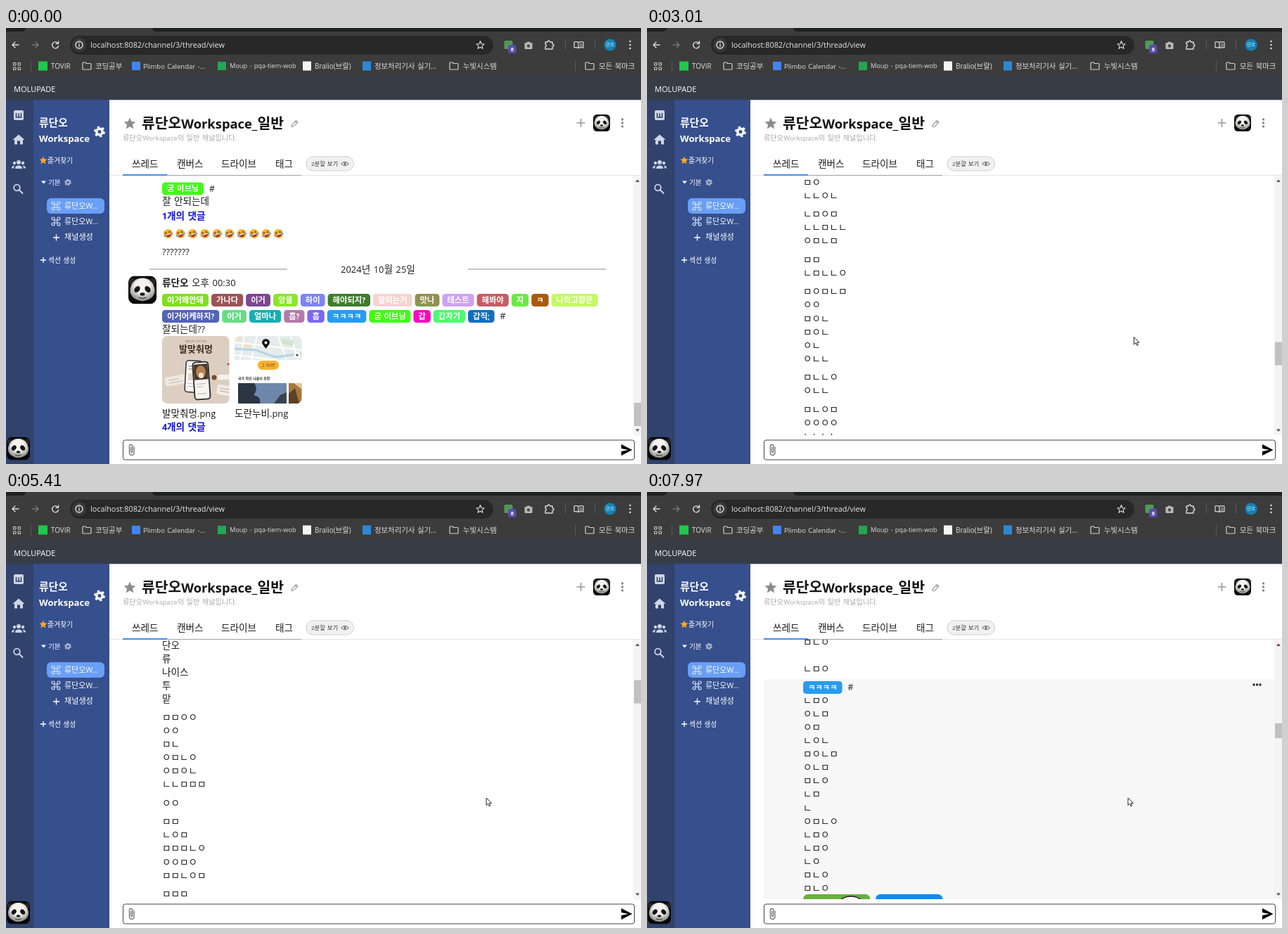
Recreate the animation shown at these times as an HTML page. Size 903 by 620 pixels, loop 8 s.

```html
<!DOCTYPE html>
<html lang="ko">
<head>
<meta charset="utf-8">
<title>Channel thread</title>
<style>
html,body{margin:0;width:100%;height:100%;overflow:hidden;background:#fff}
svg{display:block}
text{white-space:pre;word-spacing:.09em}
text,.ko{font-family:"Noto Sans CJK KR","Noto Sans CJK",sans-serif}
.en{font-family:"Open Sans","Noto Sans",sans-serif}
.ln{fill:none;stroke-linecap:round;stroke-linejoin:round}
</style>
</head>
<body>
<svg id="stage" width="903" height="620" viewBox="0 0 903 620">
<defs>
  <clipPath id="view"><rect x="147" y="210" width="756" height="369"/></clipPath>
  <clipPath id="round"><rect width="40" height="40" rx="9"/></clipPath>
  <clipPath id="card"><rect width="95.5" height="96" rx="7"/></clipPath>
  <radialGradient id="fur" cx=".5" cy=".35" r=".62"><stop offset=".45" stop-color="#f4f3f0"/><stop offset="1" stop-color="#8f8f8d"/></radialGradient>
  <symbol id="panda" viewBox="0 0 40 40">
    <g clip-path="url(#round)">
      <rect width="40" height="40" fill="#080808"/>
      <circle cx="5.500" cy="8.500" r="5" fill="#262626"/><circle cx="34.500" cy="8.500" r="5" fill="#262626"/>
      <path d="M20 3Q29 3 34 10Q39 18 37 25Q34 34 20 36Q6 34 3 25Q1 18 6 10Q11 3 20 3Z" fill="url(#fur)"/>
      <ellipse cx="12.500" cy="19" rx="3.600" ry="5" fill="#141414" transform="rotate(38 12.5 19)"/>
      <ellipse cx="27.500" cy="19" rx="3.600" ry="5" fill="#141414" transform="rotate(-38 27.5 19)"/>
      <ellipse cx="20" cy="26" rx="3.400" ry="2.200" fill="#1a1a1a"/>
      <path d="M15 30.500Q20 33.500 25 30.500" class="ln" stroke="#4a4a4a" stroke-width="1.400"/>
    </g>
  </symbol>
  <symbol id="laugh" viewBox="0 0 16 16">
    <g transform="rotate(-18 8 8)">
      <circle cx="8" cy="8" r="7" fill="#fbb32f"/>
      <path d="M3.800 8.500H12.200Q12 13 8 13T3.800 8.500Z" fill="#a03428"/>
      <path d="M4.500 8.600H11.500V9.800H4.500Z" fill="#fff"/>
      <path d="M4 4.800L6.500 6L4 7M12 4.800L9.500 6L12 7" class="ln" stroke="#6b3a12"/>
      <circle cx="2.300" cy="9.500" r="1.500" fill="#5aa9ee"/><circle cx="13.700" cy="9.500" r="1.500" fill="#5aa9ee"/>
    </g>
  </symbol>
  <symbol id="folder" viewBox="0 0 14 12"><path d="M1 2Q1 1 2 1H5L6.500 2.500H12Q13 2.500 13 3.500V10Q13 11 12 11H2Q1 11 1 10Z" class="ln" stroke="#cfcfcf" stroke-width="1.200"/></symbol>
  <symbol id="cmd" viewBox="0 0 14 14"><path d="M5 5H9V9H5ZM5 5H3A2 2 0 1 1 5 3ZM9 5V3A2 2 0 1 1 11 5ZM9 9H11A2 2 0 1 1 9 11ZM5 9V11A2 2 0 1 1 3 9Z" class="ln" stroke="#d5e2fb" stroke-width="1.200"/></symbol>
  <symbol id="gear" viewBox="0 0 16 16"><circle cx="8" cy="8" r="4.200" fill="none" stroke="currentColor" stroke-width="3.400"/><circle cx="8" cy="8" r="6.800" fill="none" stroke="currentColor" stroke-width="2.200" stroke-dasharray="3.560"/></symbol>
  <symbol id="star" viewBox="0 0 20 20"><path d="M10 1L12.700 7.200L19.400 7.800L14.300 12.200L15.900 18.800L10 15.300L4.100 18.800L5.700 12.200L.6 7.800L7.300 7.200Z"/></symbol>
</defs>

<!-- browser -->
<rect width="903" height="70" fill="#3c3c3c"/>
<rect width="903" height="5" fill="#1f2020"/>
<path d="M22 5Q28 5 28 0H208Q208 5 214 5Z" fill="#3c3c3c"/>
<rect x="91" y="11" width="602" height="27" rx="13.500" fill="#282828"/>
<circle cx="104" cy="24" r="10" fill="#3a3a3a"/>
<g class="ln" stroke="#dcdcdc" stroke-width="1.400">
  <path d="M18 24H9M13 20L9 24L13 28"/>
  <path d="M37 24H46M42 20L46 24L42 28" stroke="#777"/>
  <path d="M74 22A4.500 4.500 0 1 0 74.500 25.500M74.500 19V22.300H71.200"/>
  <circle cx="104" cy="24" r="5"/><path d="M104 23.500V26.500M104 21.300V21.500"/>
  <path d="M674.500 18.500L676 22.500L680 22.800L677 25.400L678 29.300L674.500 27.200L671 29.300L672 25.400L669 22.800L673 22.500Z" stroke-width="1.100"/>
  <path d="M767 20H770A1.800 1.800 0 0 1 773.600 20H777V23A1.800 1.800 0 0 1 777 26.600V30H767V26.500A1.800 1.800 0 0 0 767 23Z"/>
  <path d="M808 20Q811 19 814 20.500Q817 19 821 20V28Q817 27 814 28.500Q811 27 808 28ZM814 20.500V28.500M816.500 23H819M816.500 25.500H819" stroke-width="1.200"/>
</g>
<path d="M795.500 17V31M837.500 17V31M35.500 47V61M809.500 47V61" stroke="#5a5a5a"/>
<rect x="708.500" y="18" width="12" height="12" rx="2" fill="#4e9a57"/>
<rect x="714" y="24" width="11.500" height="12" rx="3" fill="#5b4bb0"/>
<path d="M738 21.500H740.500L741.300 20H744.700L745.500 21.500H748V29.500H738Z" fill="#b9b9b9" stroke="#b9b9b9" stroke-linejoin="round"/><circle cx="743" cy="25.500" r="2.200" fill="#4a4a4a"/>
<circle cx="859" cy="24" r="8.500" fill="#1283b8"/>
<g fill="#dcdcdc"><circle cx="887.500" cy="19" r="1.300"/><circle cx="887.500" cy="24" r="1.300"/><circle cx="887.500" cy="29" r="1.300"/></g>
<path d="M10.500 49.500H14V53H10.500ZM17 49.500H20.500V53H17ZM10.500 56H14V59.500H10.500ZM17 56H20.500V59.500H17Z" fill="none" stroke="#cfcfcf"/>
<rect x="46" y="47.500" width="13" height="13" fill="#1ec94c"/>
<rect x="179" y="48" width="12" height="12" fill="#4285f4"/>
<rect x="301" y="48" width="12" height="12" fill="#22a652"/>
<rect x="422" y="47.500" width="12" height="13" fill="#f4f4f4"/>
<rect x="507" y="47.500" width="12" height="13" fill="#2b88d8"/>
<use href="#folder" x="108" y="48" width="14" height="12"/><use href="#folder" x="630" y="48" width="14" height="12"/><use href="#folder" x="823" y="48" width="14" height="12"/>

<!-- app frame -->
<rect y="69" width="903" height="33" fill="#373d47"/>
<rect y="102" width="39" height="518" fill="#31426c"/>
<rect x="39" y="102" width="108" height="518" fill="#364f8d"/>
<path d="M147 102.500H903" stroke="#c9cbd0"/>
<rect x="11" y="117" width="14" height="14" rx="2" fill="#cdd5e6"/>
<path d="M14.500 121V127H21.500V121M18 121.500V127" fill="none" stroke="#31426c" stroke-width="1.500"/>
<g fill="#cdd5e6">
  <path d="M18 151.500L26.500 159H24V165.500H20V160.500H16V165.500H12V159H9.500Z"/>
  <circle cx="18" cy="191" r="3"/><circle cx="12" cy="192" r="2.200"/><circle cx="24" cy="192" r="2.200"/>
  <path d="M13 200Q13 195.500 18 195.500T23 200ZM8 199.500Q8 195.500 12.300 195.700Q11 197 11.200 199.500ZM28 199.500Q28 195.500 23.700 195.700Q25 197 24.800 199.500Z"/>
</g>
<path d="M18.500 230L23.500 235" class="ln" stroke="#cdd5e6" stroke-width="2"/><circle cx="15.500" cy="227" r="4.300" fill="none" stroke="#cdd5e6" stroke-width="1.800"/>
<use href="#panda" x="1" y="581" width="33" height="34"/>
<use href="#gear" x="125" y="139.500" width="16" height="16" color="#fff"/>
<use href="#gear" x="83" y="214.500" width="10" height="10" color="#aeb5c4"/>
<use href="#star" x="47" y="182" width="12" height="12" fill="#ffa726"/>
<path d="M50 217.500H57L53.500 221.500Z" fill="#fff"/>
<rect x="58" y="242" width="82" height="22" rx="6" fill="#699ff5"/>
<use href="#cmd" x="64" y="246" width="14" height="14"/><use href="#cmd" x="64" y="268" width="14" height="14"/>
<path d="M67 298H76M71.500 293.500V302.500M49 330H57M53 326V334" stroke="#fff" stroke-width="1.300"/>

<!-- channel header -->
<use href="#star" x="167" y="126.500" width="18" height="18" fill="#8b8b8b"/>
<path d="M406 140.500L406.500 137.500L412.500 131.500L415 134L409 140ZM411 133L413.500 135.500" fill="none" stroke="#9a9a9a" stroke-width="1.200"/>
<path d="M811.500 135H823.500M817.500 129V141" stroke="#999" stroke-width="1.600"/>
<use href="#panda" x="835" y="123" width="24" height="24"/>
<g fill="#8a8a8a"><circle cx="876.500" cy="130" r="1.700"/><circle cx="876.500" cy="135" r="1.700"/><circle cx="876.500" cy="140" r="1.700"/></g>
<rect x="427" y="183" width="67.500" height="20" rx="10" fill="#f1f1f1" stroke="#cfcfcf"/>
<path d="M476.500 193Q482 187.500 487.500 193Q482 198.500 476.500 193Z" fill="none" stroke="#666"/><circle cx="482" cy="193" r="1.700" fill="#666"/>
<path d="M147 209.500H903" stroke="#e4e4e4"/><path d="M229 209.500H420" stroke="#a0a0a0"/>

<g clip-path="url(#view)"><g id="scroll">
  <rect id="hover" x="166" width="726" fill="#f7f7f7"/>
  <g id="posts"></g><g id="latest"></g><g id="older"></g>
  <g id="dots" fill="#222"><circle cx="863" r="1.700"/><circle cx="867.500" r="1.700"/><circle cx="872" r="1.700"/></g>
</g></g>
<path d="M166 209H229" stroke="#4a8ce8" stroke-width="2"/>

<rect x="892" y="210" width="11" height="369" fill="#f4f4f4"/>
<rect id="thumb" x="893" width="10" fill="#c1c1c1"/>
<path id="up" d="M895 219L898 215.500L901 219Z"/><path d="M895 570.500L898 574L901 570.500Z" fill="#555"/>

<rect x="166.500" y="586" width="727" height="28" rx="3" fill="#fff" stroke="#444"/>
<path d="M182 595.500V604A3.300 3.300 0 0 1 175.400 604V594.500A2.200 2.200 0 0 1 179.800 594.500V602.500A1 1 0 0 1 177.600 602.500V596" class="ln" stroke="#666" stroke-width="1.200"/>
<path d="M875 592L890.500 600L875 608V602L885 600L875 598Z" fill="#000"/>
<g id="labels"></g>
<path id="cursor" d="M.5 .5V11L3 8.700L4.700 12.400L6.300 11.700L4.700 8.100H8Z" fill="#fff" stroke="#111" stroke-width=".9"/>
</svg>
<script>
const $ = id => document.getElementById(id);
const LOOP = 8000, LOAD = 6280, NAME = '류단오', GIVEN = '단오', FAMILY = '류';

function make(parent, tag, attrs, html = '') {
  const el = document.createElementNS('http://www.w3.org/2000/svg', tag);
  for (const k in attrs) el.setAttribute(k, attrs[k]);
  el.innerHTML = html;
  return parent.appendChild(el);
}

// y is the middle of the line; Latin runs are set a little smaller than Hangul
function label(parent, x, y, str, size = 13.6, fill = '#1c1c1c', bold = false, anchor = 'start') {
  const latin = size * (bold ? 0.9 : 0.95);
  const runs = str.match(/[ㄱ-힣]+|[^ㄱ-힣]+/g) || [];
  make(parent, 'text', { x, y: y + size * 0.36, fill, 'font-size': size, 'font-weight': bold ? 700 : 400, 'text-anchor': anchor },
    runs.map(r => /[ㄱ-힣]/.test(r) ? `<tspan class="ko">${r}</tspan>`
      : `<tspan class="en" font-size="${latin}">${r}</tspan>`).join(''));
}

const TAGS = {
  '이거왜안돼': '#80e01e', '가나다': '#9b5357', '이거': '#7f4592', '앙을': '#8be62b', '하이': '#7e84f7',
  '해야되지?': '#407c2c', '잘되는거': '#f5d3cf', '맛나': '#8f9150', '테스트': '#cda3f0', '해봐야': '#c75b66',
  '지': '#6ce943', 'ㅋ': '#a85a0e', '나의고향은': '#c3f965', '이거어케하지?': '#5363b5', '이거2': '#66dd82',
  '얼마나': '#18aeb1', '흠?': '#b57aa8', '흠': '#7d69f0', 'ㅋㅋㅋㅋ': '#279cf0', '굳 이브닝': '#43fb1b',
  '갑': '#f50cbc', '갑자기': '#4efa6f', '갑직;': '#1070be', '왜이러냐?': '#6060f2', '픽스': '#d9ba06', '굳굳': '#b480ec'
};
const GLYPH = { ' ': 3.4, '?': 4.8, ';': 2.8 };

function tags(g, x, y, list, hash = true) {
  for (const key of list ? list.split('|') : []) {
    const name = key.replace(/\d/, '');
    const width = [...name].reduce((w, c) => w + (GLYPH[c] || 10.4), 14);
    make(g, 'rect', { x, y: y - 9, width, height: 18, rx: 4.5, fill: TAGS[key] });
    label(g, x + 7, y - 0.3, name, 11.3, '#fff', true);
    x += width + 4;
  }
  if (hash) label(g, x + 4, y - 0.5, '#', 13);
}
const lines = (g, y, str) => str.split('|').forEach((s, i) => label(g, 222, y + i * 19.08, s));
const replies = (g, y, n) => label(g, 222, y, n + '개의 댓글', 13.6, '#1010dc', true);

function day(g, y, d) {
  make(g, 'path', { d: `M204 ${y}H400M657 ${y}H853`, stroke: '#8c8c8c' });
  label(g, 529, y, `2024년 10월 ${d}일`, 13.6, '#1c1c1c', false, 'middle');
}
function author(g, y, time) {
  make(g, 'use', { href: '#panda', x: 174, y: y - 10.5, width: 40, height: 40 });
  label(g, 222, y - 0.5, NAME, 13.6, '#1c1c1c', true);
  label(g, 264, y - 0.5, time);
}

let seed = 11;
const rnd = () => (seed = seed * 16807 % 2147483647) / 2147483647;
function chatter(g, from, to) {
  for (let y = from; y < to; y += rnd() < 0.2 ? 26.5 : 19.08) {
    let s = '';
    for (let n = 1 + rnd() * 4; n > 0; n--) s += 'ㅇㄴㅁ'[rnd() * 3 | 0];
    label(g, 222, y, s);
  }
}
const image = (g, x, y, html) => make(make(g, 'g', { transform: `translate(${x} ${y})` }), 'g', { 'clip-path': 'url(#card)' }, html);
const section = (parent, y) => make(parent, 'g', { transform: `translate(0 ${y})` });

function buildPosts() {
  const root = $('posts');

  let g = section(root, 3367);
  chatter(g, 149, 205);
  tags(g, 222, 228.5, '굳 이브닝');
  lines(g, 246, '잘 안되는데');
  replies(g, 267, 1);
  for (let i = 0; i < 10; i++) make(g, 'use', { href: '#laugh', x: 223 + i * 17.45, y: 285, width: 15, height: 15 });
  lines(g, 318, '???????');
  day(g, 343, 25);
  author(g, 363, '오후 00:30');
  tags(g, 222, 387, '이거왜안돼|가나다|이거|앙을|하이|해야되지?|잘되는거|맛나|테스트|해봐야|지|ㅋ|나의고향은', false);
  tags(g, 222, 410, '이거어케하지?|이거2|얼마나|흠?|흠|ㅋㅋㅋㅋ|굳 이브닝|갑|갑자기|갑직;');
  lines(g, 428, '잘되는데??');
  const poster = image(g, 222, 438, `<rect width="96" height="96" fill="#dccfc2"/>
    <g transform="rotate(-10 16 62)"><rect x="4" y="57" width="34" height="13" rx="3" fill="#efe8e0"/><path d="M9 62H24M9 66H30" stroke="#c4b9ae"/></g>
    <g transform="rotate(10 88 76)"><rect x="78" y="70" width="26" height="14" rx="3" fill="#f1ebe4"/><path d="M82 75H96M82 79H96" stroke="#b5aaa0"/></g>
    <g transform="rotate(3 44 60)"><rect x="33" y="35" width="23" height="45" rx="4" fill="#f8f8f8" stroke="#33302e" stroke-width="1.500"/><path d="M37 43H52M37 47H48" stroke="#c9b9a5" stroke-width="2"/><rect x="37" y="53" width="15" height="10" fill="#e3d6c6"/><path d="M37 68H52M37 72H48" stroke="#c2b6aa"/></g>
    <g transform="rotate(-4 56 64)"><rect x="45" y="37" width="22" height="53" rx="4" fill="#f7f5f2" stroke="#2a2725" stroke-width="1.800"/><path d="M46 40H66V62H46Z" fill="#463a31"/><ellipse cx="56" cy="51" rx="7" ry="9" fill="#b8814e"/><ellipse cx="56" cy="56" rx="3.500" ry="4" fill="#f0e2cf"/><path d="M49 68H62M49 72H58M49 82H62" stroke="#b9aea4"/></g>
    <circle cx="74" cy="59" r="3.500" fill="#7a4a2c"/><rect x="79" y="55" width="18" height="7" rx="2" fill="#f6f2ee"/>
    <circle cx="94" cy="40" r="1.500" fill="#d0402c"/>`);
  label(poster, 48, 7.5, '함께 걷는 우리 동네', 3.6, '#7a6a5f', false, 'middle');
  label(poster, 48, 18, '발맞춰멍', 13, '#3c2d25', true, 'middle');
  const map = image(g, 325, 438, `<rect width="96" height="96" fill="#fff"/><rect width="96" height="34" fill="#e6ebec"/>
    <path d="M0 9L96 20M0 27L60 34M14 0L8 34M32 0L24 34M62 0L74 34M80 0L90 34" fill="none" stroke="#fff" stroke-width="2"/>
    <path d="M0 18L30 20L58 30L96 25" fill="none" stroke="#b4d5e6" stroke-width="3"/>
    <path d="M66 4L84 6L83 14L68 12Z" fill="#cfe6c9"/><path d="M2 2H11V7H2ZM14 12H24V17H13Z" fill="#f0e4c8"/>
    <path d="M44.500 18Q39 11 39 9.500A5.500 5.500 0 0 1 50 9.500Q50 11 44.500 18Z" fill="#111"/><circle cx="44.500" cy="9.500" r="2" fill="#fff"/>
    <circle cx="89" cy="27" r="4.500" fill="#fff"/><circle cx="89" cy="27" r="1.500" fill="#333"/>
    <rect x="33" y="35" width="30" height="13" rx="6" fill="#f9b233"/>
    <rect x="5" y="67" width="69" height="29" fill="#6f87ab"/><path d="M5 67H28Q34 76 27 84Q38 86 36 96H5Z" fill="#2c3542"/><path d="M56 96L65 84L74 80V96Z" fill="#39434f"/>
    <rect x="77" y="67" width="19" height="29" fill="#a9783c"/><path d="M77 96V82L86 74L92 96Z" fill="#5d4128"/><path d="M84 67H96V76Z" fill="#dfc8a0"/>`);
  label(map, 48, 41.5, '그 거기든', 5, '#3a2a10', false, 'middle');
  label(map, 5, 60, '국가 최신 나들이 추천', 4.9, '#222', true);
  label(g, 222, 548, '발맞춰멍.png');
  label(g, 325, 548, '도란누비.png');
  replies(g, 567, 4);

  g = section(root, 2930);
  make(g, 'g', { transform: 'translate(234 222)' }, `<path d="M7 2H50L70 22V89Q70 95 64 95H7Q2 95 2 89V7Q2 2 7 2Z" fill="#fff" stroke="#3c4650" stroke-width="4"/>
    <path d="M50 2V17Q50 23 56 23H70Z" fill="#d5d9dc" stroke="#3c4650" stroke-width="3.500" stroke-linejoin="round"/>
    <path d="M13 2H31V30L22 22L13 30Z" fill="#4297e2" stroke="#3c4650" stroke-width="2"/>
    <path d="M14 46H58M14 62H58M14 77H46" stroke="#3c4650" stroke-width="4" stroke-linecap="round"/>`);
  lines(g, 332, '테스트용.txt');
  replies(g, 352, 4);
  tags(g, 222, 378, '가나다|픽스');
  lines(g, 396, '반가워');
  day(g, 421, 24);
  author(g, 440.5, '오전 09:40');
  tags(g, 329, 442, '흠?|이거2|갑직;|갑자기|왜이러냐?');
  lines(g, 460, '흠?');
  lines(g, 490, '왜 맨 밑으로 안가지?');
  lines(g, 516, '흠?');
  tags(g, 222, 543.5, '굳굳');
  lines(g, 561, '머지ㅋㅋ');

  g = section(root, 1812);
  lines(g, 216, `ㅁ|마이|이즈|${GIVEN}|${FAMILY}ㄴㄴㄴㄴㄴ|네임ㄴㄴㄴ`);
  lines(g, 337, `하이|네|나이스투|밑유임|ㅇㅣ즈|${GIVEN}|${FAMILY}|마이`);
  lines(g, 497, '굳');
  lines(g, 523, '네임');
  tags(g, 222, 551, '가나다');
  lines(g, 568, '그래버즈');
  chatter(g, 594, 1325);

  g = section(root, 962);
  tags(g, 222, 235, '이거왜안돼|이거어케하지?');
  lines(g, 252, '하이ㅁ나|마이|네임|이즈바람ㅋㅋㅋ|||ㅇㄴㅁㅇㄴㅁ||ㅇㄴㅁㄴㅇㅁ||ㅇㄴㅁ|ㄴㅇ');
  day(g, 487, 23);
  author(g, 507, '오전 09:17');
  tags(g, 329, 508, '하이');
  lines(g, 526, 'ㅋㅋㅋㄴㄴ|ㅋㅌㅊ|ㅋㅌㅊㅊ');
  chatter(g, 583, 1050);

  tags(root, 222, 541, '가나다|이거어케하지?');
  lines(root, 558.5, `마이|네임|이즈|${GIVEN}|${FAMILY}|나이스|투|맡`);
  chatter(root, 718, 1190);
}

function buildLatest() {
  const g = $('latest');
  const bar = (x, y, width) => make(g, 'rect', { x, y: y - 5, width, height: 10, rx: 5, fill: '#dfdfdf' });
  for (const y of [14, 131.5, 249, 366.5]) {
    make(g, 'circle', { cx: 197.5, cy: y, r: 19, fill: '#dfdfdf' });
    bar(229, y, 650);
    bar(179, y + 43, 700);
    bar(179, y + 58.5, 363);
    bar(179, y + 74.5, 508);
  }
  day(g, 470.5, 21);
  author(g, 490.5, '오후 00:13');
  tags(g, 329, 490, '');
  lines(g, 509, '하이');
}

function buildOlder() {
  let g = section($('older'), 118);
  make(g, 'rect', { id: 'mark', x: 166, y: 386, width: 726, height: 20.5, fill: '#e2bb78' });
  lines(g, 210, 'ㅇㄴㅁ|ㅇㄴㅁ|ㄴㅇ');
  lines(g, 275, 'ㄴ|ㅇㅁ|ㅇㅁㅇㅁㄴ|ㅇㄴㅁ|ㄴㅇㅁ|ㄴㅇㅁ');
  lines(g, 395.5, '하이');

  g = section($('older'), -426);
  lines(g, 213, 'ㅁㄴㅇ||ㄴㅁㅇ');
  tags(g, 222, 278, 'ㅋㅋㅋㅋ');
  lines(g, 296, 'ㄴㅁㅇ|ㅇㄴㅁ|ㅇㅁ|ㄴㅇㄴ|ㅁㅇㄴㅁ|ㅇㄴㅁ|ㅁㄴㅇ|ㄴㅁ|ㄴ|ㅇㅁㄴㅇ|ㄴㅁㅇ|ㄴㅁㅇ|ㄴㅇ|ㅁㄴㅇ|ㅁㄴㅇ');
  image(g, 222, 572, '<rect width="96" height="96" fill="#69b03c"/><ellipse cx="68" cy="22" rx="22" ry="19" fill="#fff" stroke="#222" stroke-width="1.500"/>');
  image(g, 325, 572, '<rect width="96" height="96" fill="#0a8af7"/>');
  label(g, 222, 682, '그림.png');
  label(g, 325, 682, '파랑.png');
  lines(g, 716, 'ㄴㅁㅇ|ㅇㅁ');
}

function buildLabels() {
  const put = (...a) => label($('labels'), ...a), pale = '#dedede', white = '#fff';
  put(120, 24, 'localhost:8082/channel/3/thread/view', 11.4, '#e6e6e6');
  put(720, 30.2, '8', 8.5, white, true, 'middle');
  put(859, 24, GIVEN, 6.3, white, false, 'middle');
  put(64, 54, 'TOVIR', 10.4, pale);
  put(127, 54, '코딩공부', 10.4, pale);
  put(195, 54, 'Plimbo Calendar -...', 10, pale);
  put(318, 54, 'Moup - pqa-tiem-wob', 9.7, pale);
  put(439, 54, 'Bralio(브랄)', 10.4, pale);
  put(524, 54, '정보처리기사 실기...', 10.4, pale);
  put(650, 54, '누빛시스템', 10.4, pale);
  put(843, 54, '모든 북마크', 10.4, pale);
  put(11, 87, 'MOLUPADE', 11.6, white);
  put(47, 135, NAME, 14.8, white, true);
  put(47, 157, 'Workspace', 14.6, white, true);
  put(59, 188, '즐겨찾기', 9.8, white);
  put(60, 219.5, '기본', 9.6, white);
  put(83, 253, NAME + 'W...', 11, white);
  put(83, 275, NAME + 'W...', 11, white);
  put(83, 297, '채널생성', 11.1, white);
  put(60, 330.5, '섹션 생성', 9.8, white);
  put(193, 135.5, NAME + 'Workspace_일반', 20.4, '#111', true);
  put(166, 156.5, NAME + 'Workspace의 일반 채널입니다.', 10.2, '#a9a9a9');
  put(179, 193, '쓰레드');
  put(243, 193, '캔버스');
  put(306, 193, '드라이브');
  put(383, 193, '태그');
  put(434, 193, '2분할 보기', 8.4, '#333');
}

// steps: start, end, count, then the values reached
const SCROLL = [
  [1430, 2050, 10, 2985], [2250, 2320, 2, 2930], [2390, 3700, 19, 1812], [3770, 4730, 14, 962],
  [4800, 5410, 10, 398], [5540, 6010, 8, 0], [LOAD, LOAD, 1, 118], [6890, 7100, 4, -68], [7430, 7970, 8, -426]
];
const POINTER = [
  [380, 1150, 12, 758, 465], [1220, 1290, 2, 757, 463], [1430, 2050, 10, 692, 439],
  [3770, 4730, 14, 683.5, 434.5], [4800, 6010, 18, 681.5, 434.5], [7430, 7970, 8, 683.5, 434.5]
];
// hovered post: from, to, top, bottom
const HOVERS = [
  [620, 1500, 3718, 3946], [3560, 4150, 2298.5, 2319.5], [4660, 5340, 1459, 1690], [5870, 6960, 529.5, 720], [7700, LOOP, -160, 290]
];

function at(steps, value, t) {
  for (const [a, b, n, ...to] of steps) {
    if (t < a) break;
    const i = b > a ? Math.min(n, Math.floor((t - a) / (b - a) * (n - 1) + 1e-6) + 1) : n;
    value = value.map((v, k) => v + (to[k] - v) * i / n);
  }
  return value;
}
const show = (id, on) => $(id).setAttribute('visibility', on ? 'visible' : 'hidden');

function render(t) {
  const [top] = at(SCROLL, [3367], t), loaded = t >= LOAD;
  $('scroll').setAttribute('transform', `translate(0 ${-top})`);
  show('latest', !loaded);
  show('older', loaded);
  $('mark').setAttribute('opacity', 1 - Math.min(1, Math.max(0, (t - LOAD) / 820)) ** 3.2);

  $('thumb').setAttribute('y', loaded ? 360 + (top - 118) * 31 / 544 : 232 + top * 301 / 3367);
  $('thumb').setAttribute('height', loaded ? 21 : 33);
  $('up').setAttribute('fill', loaded ? '#8a2f2f' : '#555');

  const hover = HOVERS.find(([a, b]) => t >= a && t < b);
  show('hover', hover);
  show('dots', hover);
  if (hover) {
    $('hover').setAttribute('y', hover[2]);
    $('hover').setAttribute('height', hover[3] - hover[2]);
    $('dots').setAttribute('transform', `translate(0 ${hover[2] + 8})`);
  }
  $('cursor').setAttribute('transform', `translate(${at(POINTER, [873, 622], t)})`);
}

buildPosts();
buildLatest();
buildOlder();
buildLabels();
const start = performance.now();
function tick() {
  render((performance.now() - start) % LOOP);
  requestAnimationFrame(tick);
}
tick();
</script>
</body>
</html>
```
